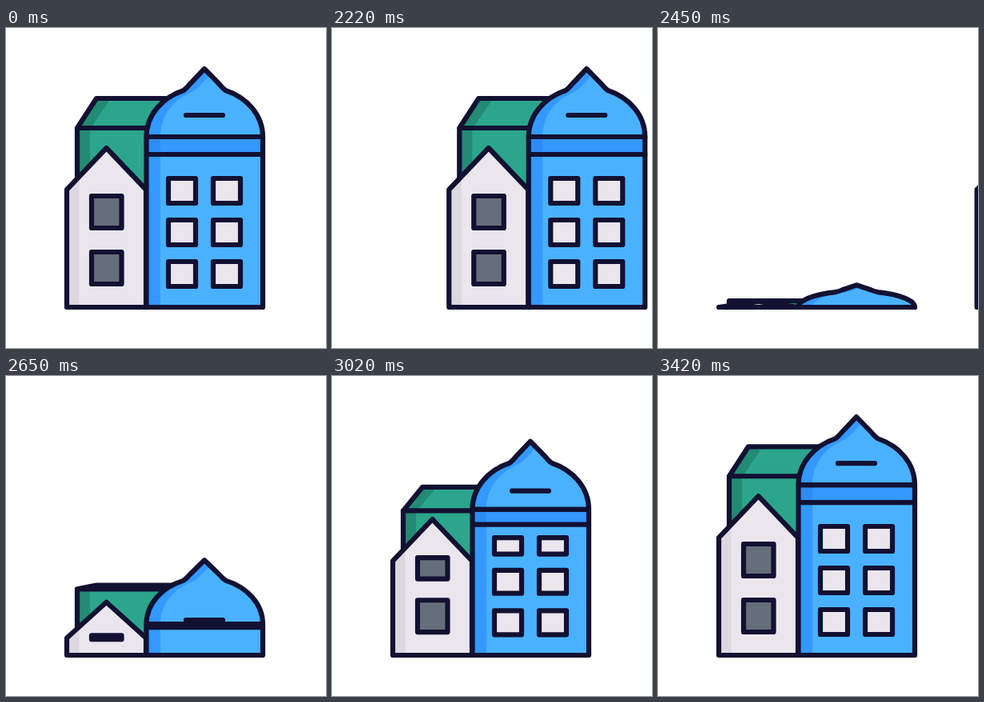
Animation, 400 px wide and 400 px high, one loop 3.45 s. Source, as an HTML page:

```html
<!DOCTYPE html>
<html lang="en">
<head>
<meta charset="utf-8">
<title>City buildings</title>
<style>
html, body { margin: 0; width: 100%; height: 100%; overflow: hidden; background: #fff; }
svg { display: block; width: 100vw; height: 100vh; }
.line { stroke: #121132; stroke-width: 6.2; stroke-linecap: round; stroke-linejoin: round; }
</style>
</head>
<body>
<svg viewBox="0 0 400 400">
  <g id="rising"></g>
  <g id="leaving"></g>
</svg>
<script>
const LOOP = 3450, GROUND = 349;
const BLUE = '#4ab1ff', DEEP = '#3398ff', NAVY = '#2e8cf7', GREEN = '#2ca58d', PINE = '#238a73';
const WALL = '#ebe6ed', SHADE = '#ddd7e0', GLASS = '#656f7a';
const rising = document.getElementById('rising');
const leaving = document.getElementById('leaving');

// Start and length of each growth, in ms; soft is the second handle of the easing
const STEPS = {
  dome:  { at: 2336, len: 450, soft: .2 },
  tower: { at: 2454, len: 1000, soft: .2 },
  gable: { at: 2364, len: 500, soft: .2 },
  house: { at: 2455, len: 995, soft: .333 },
  roof:  { at: 2470, len: 980, soft: .333 }
};
const GREEN_AT = 2432;
const WINDOW_LEN = 500;
const TOWER_WINDOWS = [[323, 2634], [271, 2680], [219, 2818]];
const HOUSE_WINDOWS = [[320, 2568], [250, 2818]];

const clamp = v => Math.max(0, Math.min(1, v));

// Cubic easing with handles (1/3, 0) and (soft, 1)
function ease(x, soft) {
  if (x <= 0 || x >= 1) return clamp(x);
  let lo = 0, hi = 1, s;
  for (let i = 0; i < 24; i++) {
    s = (lo + hi) / 2;
    const r = 1 - s;
    if (r * r * s + 3 * r * s * s * soft + s * s * s < x) lo = s; else hi = s;
  }
  return s * s * (3 - 2 * s);
}

const grow = (t, { at, len, soft }) => ease((t - at) / len, soft);
const path = (d, fill, line = true) =>
  `<path d="${d}" fill="${fill}"${line ? ' class="line"' : ''}/>`;

// Windows unfold from a point a little below their sill
function panes(t, rows, xs, w, h, fill) {
  return rows.map(([sill, at]) => {
    const s = ease((t - at) / WINDOW_LEN, .2);
    if (s < .01) return '';
    const bottom = sill + 10.5 * (1 - s);
    return xs.map(x => path(`M${x} ${bottom}h${w}v${-h * s}h${-w}z`, fill)).join('');
  }).join('');
}

function drawGreen(t) {
  if (t < GREEN_AT) return '';
  const k = 1 - Math.pow(1 - clamp((t - GREEN_AT) / 1018), 1.9);
  const eave = GROUND - 224 * k;
  const top = eave - 37 * grow(t, STEPS.roof);
  return path(`M89 ${eave}H215V${GROUND}H89z`, GREEN, false) +
    path(`M89 ${eave}H105V${GROUND}H89z`, PINE, false) +
    path(`M89 ${eave}L113 ${top}H215V${eave}z`, GREEN, false) +
    path(`M89 ${eave}L113 ${top}H131L106 ${eave}z`, PINE, false) +
    path(`M89 ${eave}H215V${GROUND}H89zL113 ${top}H215V${eave}`, 'none');
}

function drawHouse(t) {
  if (t < STEPS.gable.at) return '';
  const side = GROUND - 147 * grow(t, STEPS.house);
  const rise = 52 * grow(t, STEPS.gable);
  const shape = `M76 ${GROUND}V${side}L125.5 ${side - rise}L175 ${side}V${GROUND}z`;
  return path(shape, WALL, false) +
    path(`M76 ${GROUND}V${side}L91.5 ${side - rise * .313}V${GROUND}z`, SHADE, false) +
    path(shape, 'none') +
    panes(t, HOUSE_WINDOWS, [107], 37.5, 40, GLASS);
}

function drawTower(t) {
  if (t < STEPS.dome.at) return '';
  const k = grow(t, STEPS.tower), d = grow(t, STEPS.dome);
  const base = GROUND - 213 * k, band = GROUND - 191 * k, bar = GROUND - 240 * k;
  const y = up => base - up * d;
  const left = `M175.5 ${base}C175.5 ${y(27)} 195 ${y(49)} 222 ${y(58)}Q226 ${y(61)} 230 ${y(66)}L248 ${y(85)}`;
  const dome = left + `L266.5 ${y(66)}Q270.5 ${y(61)} 274.5 ${y(58)}C301.5 ${y(49)} 321 ${y(27)} 321 ${base}z`;
  const domeShade = left +
    `L255 ${y(78)}Q240 ${y(60)} 234 ${y(57)}C211 ${y(48)} 193 ${y(28)} 193 ${base}z`;
  const body = `M175.5 ${base}H321V${GROUND}H175.5z`;
  return path(dome, BLUE, false) + path(domeShade, DEEP, false) +
    path(body, BLUE, false) +
    path(`M176 ${base}H193V${GROUND}H176z`, DEEP, false) +
    path(`M176 ${base}H321V${band}H176z`, DEEP, false) +
    path(`M176 ${base}H193V${band}H176z`, NAVY, false) +
    path(dome, 'none') + path(body, 'none') +
    path(`M176 ${band}H321M225 ${bar}H271`, 'none') +
    panes(t, TOWER_WINDOWS, [203, 259], 34, 31, WALL);
}

const draw = t => drawGreen(t) + drawHouse(t) + drawTower(t);

leaving.innerHTML = draw(LOOP + 100);

function frame(now) {
  const t = now % LOOP;
  const shift = 69.6 * Math.pow(Math.max(0, t - 1990) / 230, 2.206);
  leaving.setAttribute('transform', `translate(${Math.min(shift, 420)} 0)`);
  rising.innerHTML = draw(t);
}

const start = performance.now();
function tick() {
  frame(performance.now() - start);
  requestAnimationFrame(tick);
}
tick();
</script>
</body>
</html>
```
